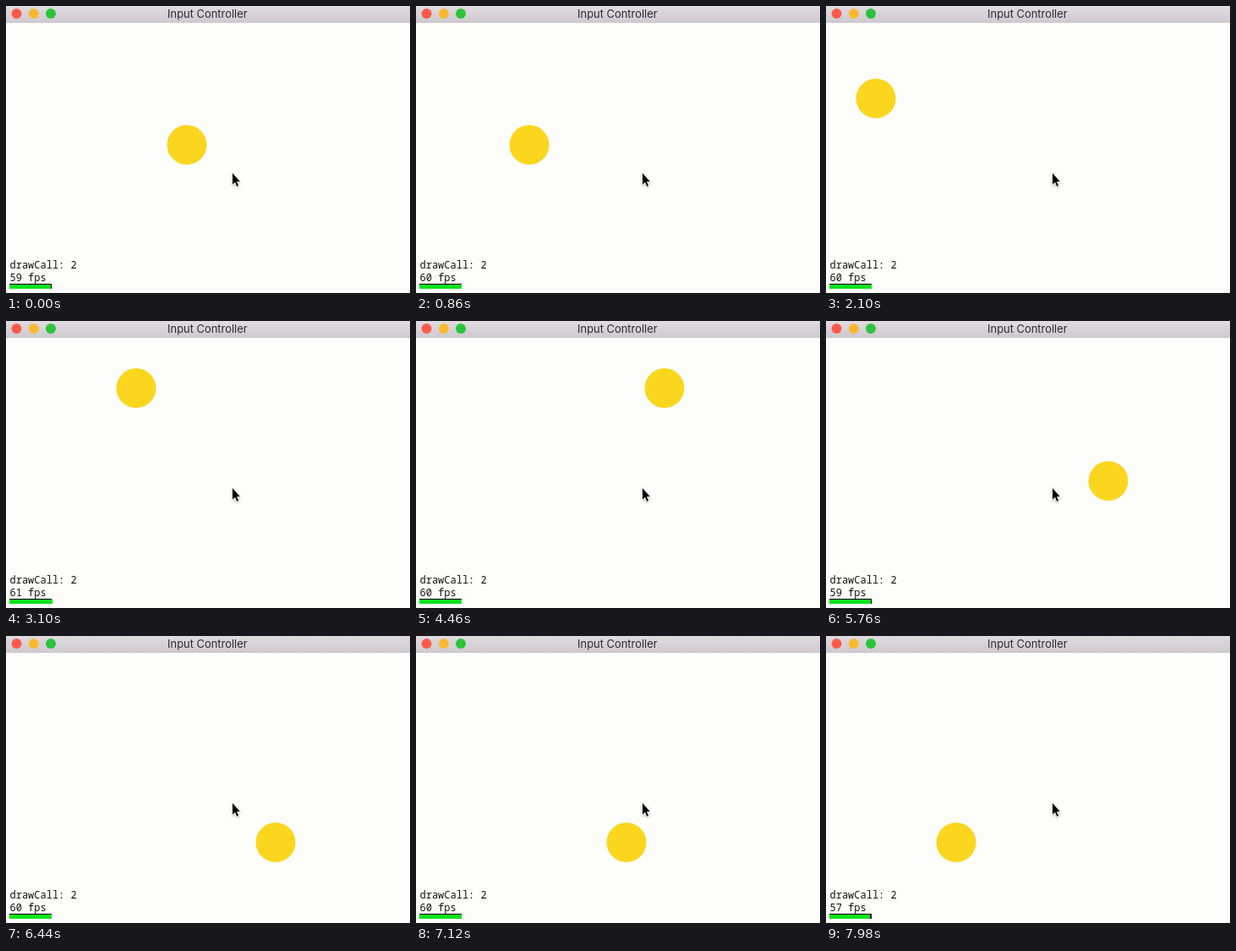
An HTML page with a canvas for the animation above (8000 ms loop, 478 by 340 pixels).

```html
<!DOCTYPE html>
<html lang="en">
<head>
<meta charset="utf-8">
<title>Input Controller</title>
<style>
  html, body { margin: 0; width: 100%; height: 100%; overflow: hidden; background: #fdfdfc; }
  canvas { display: block; }
</style>
</head>
<body>
<canvas id="stage" width="478" height="340"></canvas>
<script>
const ctx = document.getElementById('stage').getContext('2d');
const LOOP = 8000;
const SPEED = 5; // pixels per step

// Held arrow keys: first step, last step, direction.
const keys = [
  [4, 35, -1, 0],
  [35, 52, 0, -1],
  [49, 104, 1, 0],
  [103, 136, 0, 1],
  [136, 172, -1, 0],
];
const fpsChanges = [[0, 59], [540, 60], [2640, 61], [3480, 60], [5300, 59], [6280, 60], [7680, 57]];

// Steps come in threes: 20, 20 and 100 ms long.
function stepAt(time) {
  const t = time + 20;
  return 3 * Math.floor(t / 140) + Math.min(2, Math.floor(t % 140 / 20));
}

function ballAt(step) {
  const ball = { x: 214, y: 164.5 };
  for (const [from, to, dx, dy] of keys) {
    const held = Math.max(0, Math.min(step, to) - from);
    ball.x += dx * held * SPEED;
    ball.y += dy * held * SPEED;
  }
  return ball;
}

function rect(color, x, y, w, h) {
  ctx.fillStyle = color;
  ctx.fillRect(x, y, w, h);
}

function disc(color, x, y, r) {
  ctx.fillStyle = color;
  ctx.beginPath();
  ctx.arc(x, y, r, 0, 2 * Math.PI);
  ctx.fill();
}

function text(string, x, y, font, color, align = 'left') {
  ctx.font = font;
  ctx.fillStyle = color;
  ctx.textAlign = align;
  ctx.fillText(string, x, y);
}

function drawTitleBar() {
  const shade = ctx.createLinearGradient(0, 0, 0, 20);
  shade.addColorStop(0, '#e0dce0');
  shade.addColorStop(1, '#cdc9ce');
  rect(shade, 0, 0, 478, 20);
  disc('#fc5b4c', 12.5, 9, 6);
  disc('#fbb930', 32.8, 9, 6);
  disc('#2bc43c', 53, 9, 6);
  text('Input Controller', 238.3, 14, '12.9px Inter, sans-serif', '#2c2a2e', 'center');
}

function drawStats(fps) {
  const font = '500 12px "Noto Sans Mono", monospace';
  text('drawCall: 2', 4.5, 311, font, '#111');
  text(fps + ' fps', 4.5, 326, font, '#111');
  rect('#000', 4, 329, 50, 6);
  rect('#0be31b', 4, 330, Math.round(50 * fps / 60), 5);
}

function drawCursor() {
  const arrow = new Path2D('M268 198V211.6L271.1 208.7L273.2 213.8L275.1 213L273 208H276.8Z');
  ctx.save();
  ctx.shadowColor = 'rgba(0, 0, 0, 0.3)';
  ctx.shadowBlur = 3;
  ctx.shadowOffsetY = 1;
  ctx.strokeStyle = '#fff';
  ctx.lineWidth = 1.4;
  ctx.stroke(arrow);
  ctx.restore();
  ctx.fillStyle = '#000';
  ctx.fill(arrow);
}

function draw(now) {
  const time = now % LOOP;
  const ball = ballAt(stepAt(time));
  const [, fps] = fpsChanges.findLast(([start]) => start <= time);
  rect('#fdfdfc', 0, 0, 478, 340);
  drawTitleBar();
  disc('#fad61e', ball.x, ball.y, 23.5);
  drawStats(fps);
  drawCursor();
  requestAnimationFrame(draw);
}

draw(0);
</script>
</body>
</html>
```
